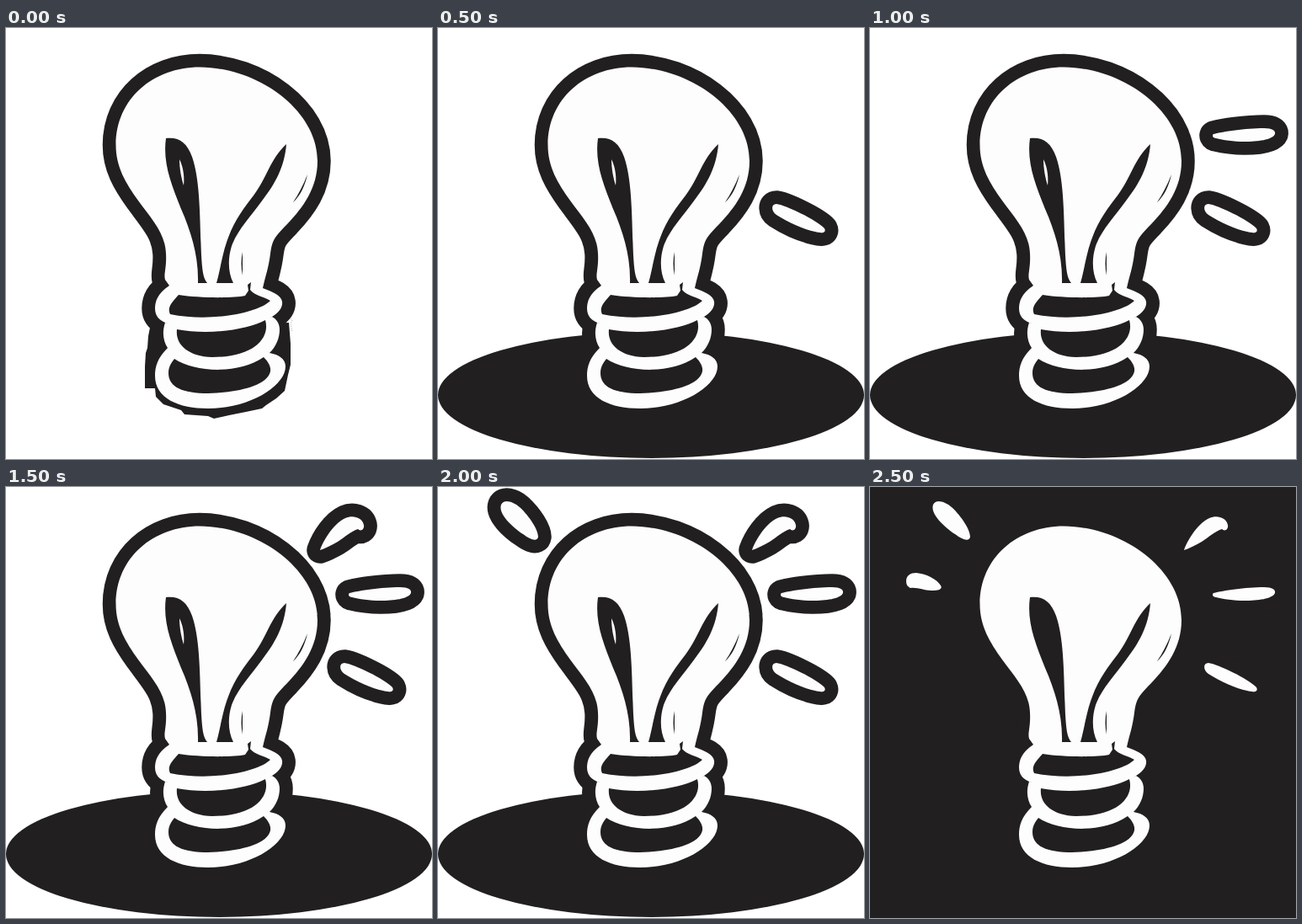
An HTML page without scripts that plays this animation: 506 by 512 pixels, repeating every 3 s.

```html
<!DOCTYPE html>
<html lang="en">
<head>
<meta charset="utf-8">
<title>Light bulb</title>
<style>
  :root { --ink: #211f20; --glow: #fdfdfd; }
  html, body { margin: 0; width: 100%; height: 100%; overflow: hidden; background: #fff; }
  svg { display: block; width: 100%; height: 100%; }
  .ink { fill: var(--ink); }
  .glow { fill: var(--glow); }
  .outlined { stroke: var(--ink); stroke-width: 31.5; stroke-linejoin: round; paint-order: stroke; }
  .step { animation: 3s step-end infinite; }
  .start { animation-name: start; }
  .one { animation-name: one; }
  .two { animation-name: two; }
  .three { animation-name: three; }
  .four { animation-name: four; }
  .five { animation-name: five; }
  .unlit { animation-name: unlit; }
  @keyframes start { 0% { visibility: visible } 16.666%, to { visibility: hidden } }
  @keyframes one { 0% { visibility: hidden } 16.666%, to { visibility: visible } }
  @keyframes two { 0% { visibility: hidden } 33.333%, to { visibility: visible } }
  @keyframes three { 0% { visibility: hidden } 50%, to { visibility: visible } }
  @keyframes four { 0% { visibility: hidden } 66.666%, to { visibility: visible } }
  @keyframes five { 0% { visibility: hidden } 83.333%, to { visibility: visible } }
  @keyframes unlit { 0% { visibility: visible } 83.333%, to { visibility: hidden } }
</style>
</head>
<body>
<svg viewBox="0 0 506 512" preserveAspectRatio="none">
  <defs>
    <path id="base" d="M189 350C185 362 187 372 192 380C180 392 177 402 177 413C177 440 205 452 240 452C290 452 332 425 332 402C332 393 324 388 313 386C321 378 325 368 325 358C325 350 320 345 316 343C290 355 215 355 189 350Z"/>
  </defs>

  <!-- Floor shadow -->
  <g class="step start ink">
    <path d="M171 356L169 366 168 380 166 386 165 402 165 428 177 428 178 438 187 447 208 454 212 459 240 461 247 464 265 460 285 456 304 452 309 448 321 440 331 431 335 412 338 400 338 375 336 350Z"/>
    <path d="M336 344l4 3-2 4 2 9" fill="none" stroke="#aaa" stroke-dasharray="1 1.5"/>
  </g>
  <g class="step one ink">
    <ellipse cx="253" cy="436" rx="253" ry="75"/>
    <use href="#base" class="outlined"/>
  </g>
  <rect class="step five ink" width="506" height="512"/>

  <!-- Rays -->
  <g class="glow outlined">
    <path class="step one" d="M402 209C412 210 450 228 459 238C462 244 455 244 448 242C434 239 416 231 402 222C396 218 395 209 402 209Z"/>
    <path class="step two" d="M408 126C420 123 445 119 468 119C478 119 482 122 481 126C478 133 460 135 445 135C432 135 419 133 411 131C407 131 406 127 408 126Z"/>
    <path class="step three" d="M373 75C378 61 390 43 403 37C412 33 423 36 425 45C426 51 421 53 418 50C409 53 402 60 394 65C387 69 379 73 373 75Z"/>
    <path class="step four" d="M75 21C78 14 89 17 97 24C109 35 119 51 119 59C118 66 109 62 101 56C89 48 71 32 75 21Z"/>
    <path class="step five" d="M43 112C43 105 48 102 55 102C67 103 80 110 84 117C87 122 80 123 73 123C64 123 57 119 48 120C44 118 43 115 43 112Z"/>
  </g>

  <!-- Glass and screw cap -->
  <path class="glow outlined" d="M230 46.5C300 47 370 98 370 158C370 190 353 213 334 233C318 249 316 253 314 268C312 285 308 295 305 309C315 313 327 317 328 325C329 332 324 338 316 343C290 360 215 360 189 350C183 347 177 343 177 333C177 325 180 315 194 306L189 299C187 292 191 285 190 268C189 244 174 228 157 205C142 184 130.500 165 130.500 139C130.500 84 175 46.500 230 46.500Z"/>
  <use href="#base" class="glow"/>
  <g class="ink">
    <path d="M205 317C230 321 270 321 284 318L288 312 287 305 291 302 290 311C295 318 306 319 314 324C300 338 245 350 195 340C191 332 197 326 205 317Z"/>
    <path d="M203 358C240 365 285 359 308 347C314 368 295 391 245 391C215 390 201 375 203 358Z"/>
    <path d="M200 393C225 409 275 412 306 391C313 398 316 405 313 411C305 428 265 434 235 434C205 433 193 424 193 410C193 403 196 398 200 393Z"/>
  </g>

  <!-- Filament and glints -->
  <g class="ink">
    <path d="M190 131C205 129 215 136 221 153C231 182 230 225 232 270C233 287 234 297 239 303L228 303C229 270 219 240 208 215C196 185 186 160 190 131Z"/>
    <path d="M333 138C331 165 319 186 305 204C289 226 275 240 268 259C263 275 264 291 270 303L250 303C255 285 257 267 264 249C272 227 284 212 294 199C310 178 314 155 333 138Z"/>
    <path d="M358 174C355 188 349 200 341 207C347 198 353 187 358 174Z"/>
    <path d="M281 266C279 275 279 284 281 294Z"/>
  </g>
  <path class="step unlit glow" d="M206 156C211 166 212 178 211 187C208 178 206 166 206 156Z"/>
</svg>
</body>
</html>
```
